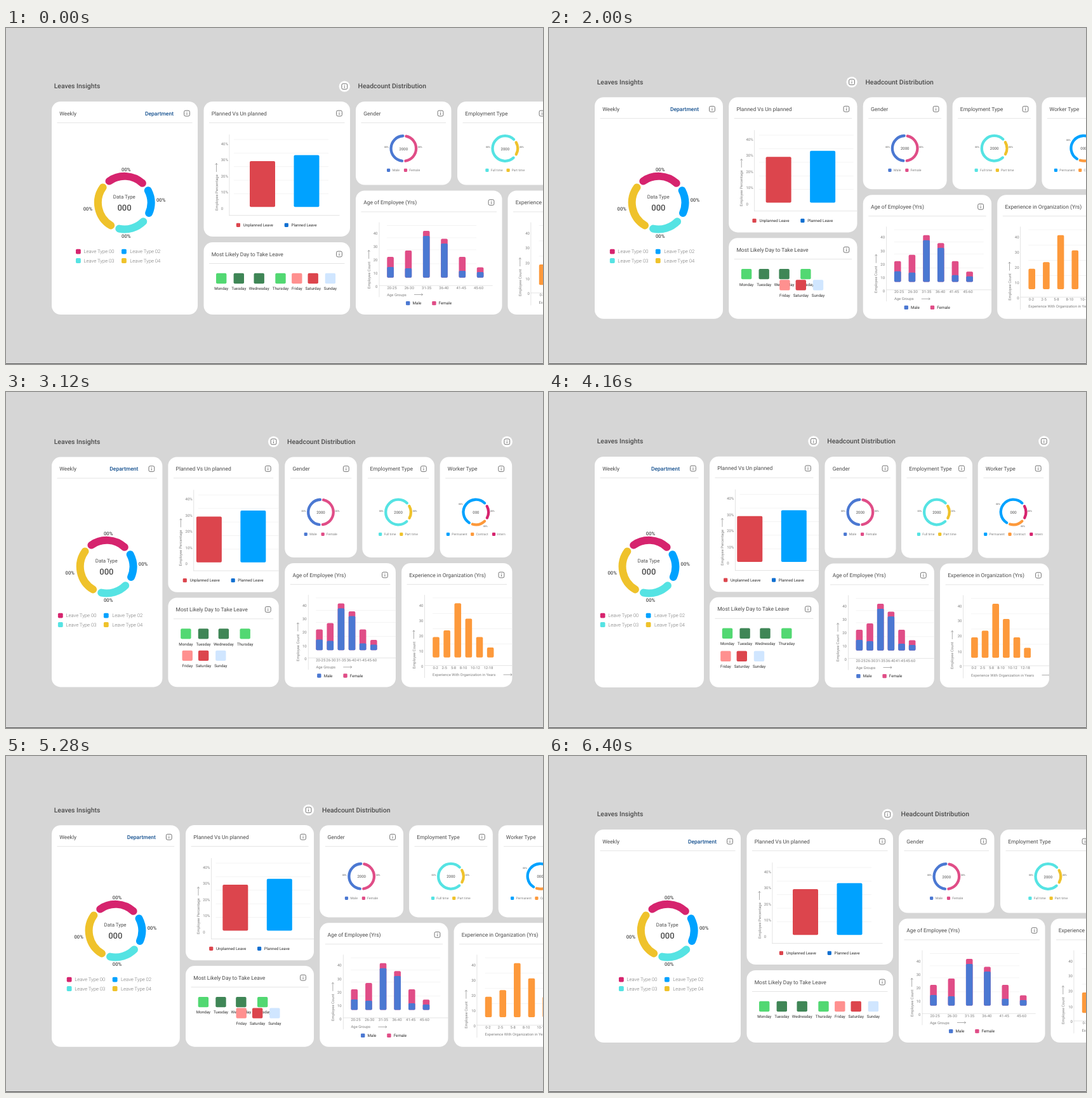
An HTML page that plays this animation: 846 by 530 pixels, repeating every 6480 ms.

```html
<!DOCTYPE html>
<html lang="en">
<head>
<meta charset="utf-8">
<title>Responsive HR dashboard</title>
<style>
  @property --p { syntax: "<number>"; inherits: true; initial-value: 0; }
  html, body { margin: 0; width: 100%; height: 100%; overflow: hidden; background: #d6d6d6; }
  #stage {
    display: block; width: 100%; height: 100%;
    font-family: Roboto, sans-serif; text-rendering: geometricPrecision;
    animation: squeeze 6480ms infinite;
  }
  /* --p: 0 is the wide layout, 1 the narrow one */
  @keyframes squeeze {
    0% { --p: 0; }
    8.64% { --p: 0; animation-timing-function: cubic-bezier(.37, 0, .63, 1); }
    54.09% { --p: 1; }
    65.43% { --p: 1; animation-timing-function: cubic-bezier(.35, .31, .65, .78); }
    98.77%, 100% { --p: 0; }
  }
  text { fill: #4c4c4c; }
  .mid { text-anchor: middle; }
  .end { text-anchor: end; }
  .medium { font-weight: 500; }
  .light { font-weight: 300; fill: #777; }
  .dim { fill: #808080; }
  .dark { fill: #2c2c2c; }
  .link { fill: #14508f; font-weight: 500; }
  .icon { fill: none; stroke: #666; stroke-width: .9; }
  .arrow { fill: none; stroke: #888; stroke-width: .7; }
  .ring { fill: none; stroke-linecap: round; }
</style>
</head>
<body>
<svg id="stage" viewBox="0 0 846 530"></svg>
<script>
const NS = "http://www.w3.org/2000/svg";
const stage = document.getElementById("stage");
const C = {
  pink: "#d6246e", sky: "#00a2ff", cyan: "#55e3e3", yellow: "#efc22b",
  red: "#dc454d", blue: "#0f6fd1", male: "#4b78d2", female: "#e04d87",
  orange: "#fd993b", mint: "#52d872", green: "#3f8656", salmon: "#ff908f",
  pale: "#d0e6ff", axis: "#dedede", grid: "#f1f1f1"
};

const mix = (a, d) => d ? `calc(${a}px + ${d}px * var(--p))` : `${a}px`;

function add(parent, tag, attrs = {}) {
  const el = document.createElementNS(NS, tag);
  for (const key in attrs) el.setAttribute(key, attrs[key]);
  return parent.appendChild(el);
}

function group(parent, x, y, dx = 0, dy = 0) {
  const g = add(parent, "g");
  g.style.transform = `translate(${mix(x, dx)}, ${mix(y, dy)})`;
  return g;
}

function rect(parent, x, y, width, height, fill, rx = 0) {
  return add(parent, "rect", { x, y, width, height, fill, rx });
}

// y is the middle of the capitals
function text(parent, str, x, y, size, cls = "") {
  const el = add(parent, "text", { x, y: y + size * .356, "font-size": size, class: cls });
  el.textContent = str;
  return el;
}

function icon(parent) {
  add(parent, "rect", { x: -4.4, y: -4.4, width: 8.8, height: 8.8, rx: 2.2, class: "icon" });
  add(parent, "path", { d: "M0 -2.4v1M0 -.5v2.9", class: "icon" });
}

function arrow(parent, x, y, turn = 0) {
  add(parent, "path", {
    d: "M0 0h13.5m-2.2 -1.8l2.2 1.8l-2.2 1.8", class: "arrow",
    transform: `translate(${x} ${y}) rotate(${turn})`
  });
}

function sideLabel(parent, str, x, y, arrowY) {
  const g = add(parent, "g", { transform: `translate(${x} ${y}) rotate(-90)` });
  text(g, str, 0, 0, 5.9, "dim");
  arrow(parent, x, arrowY, -90);
}

// Each segment is [from, to, colour], in degrees clockwise from the top
function ring(parent, r, width, segments) {
  const point = deg => {
    const a = deg * Math.PI / 180;
    return `${(r * Math.sin(a)).toFixed(2)} ${(-r * Math.cos(a)).toFixed(2)}`;
  };
  for (const [from, to, stroke] of segments) {
    add(parent, "path", {
      d: `M${point(from)}A${r} ${r} 0 ${to - from > 180 ? 1 : 0} 1 ${point(to)}`,
      stroke, "stroke-width": width, class: "ring"
    });
  }
}

// Each item is [label, colour, swatch x, text x]
function legend(parent, items, y, box, size, cls) {
  for (const [label, color, x, tx] of items) {
    rect(parent, x, y - box / 2, box, box, color, box * .22);
    text(parent, label, tx, y, size, cls);
  }
}

let cards = 0;

// Returns the group for the card's content, clipped to the card
function card(title, x, y, w, h, dx, dy, dw, dh) {
  const g = group(stage, x, y, dx, dy);
  const id = `card${++cards}`;
  for (const parent of [g, add(g, "clipPath", { id })]) {
    const face = rect(parent, 0, 0, w, h, "#fff", 14);
    face.style.width = mix(w, dw);
    face.style.height = mix(h, dh);
  }
  const c = add(g, "g", { "clip-path": `url(#${id})` });
  text(c, title, 12.2, 18.6, 8.5);
  icon(group(c, w - 17, 18.6, dw));
  rect(c, 8.5, 33, w - 17, .9, "#e2e2e2").style.width = mix(w - 17, dw);
  return c;
}

function heading(str, x, dx, iconX, iconDx) {
  text(group(stage, x, 91.7, dx, -14), str, 0, 0, 10.4, "medium");
  const g = group(stage, iconX, 92.2, iconDx, -14.4);
  add(g, "circle", { r: 8.6, fill: "#fff" });
  icon(g);
}

function weekly() {
  const c = card("Weekly", 72, 116, 230, 336, 0, -14, -58, 28);
  text(group(c, 192, 18.6, -58), "Department", 0, 0, 8.5, "link end");
  const g = group(c, 114.7, 159.6, -29.3, 14);
  ring(g, 41.8, 12, [
    [-35.4, 42.4, C.pink], [62.5, 113, C.sky], [135, 191.6, C.cyan], [211, 305.4, C.yellow]
  ]);
  text(g, "Data Type", -.4, -9.5, 7.9, "mid");
  text(g, "000", -.2, 7.8, 13, "mid medium");
  for (const [x, y] of [[2.6, -52.5], [57.4, -4], [2.6, 52.6], [-57.8, 9.6]])
    text(g, "00%", x, y, 7.7, "mid medium");
  legend(g, [["Leave Type 00", C.pink, -76.7, -64.2], ["Leave Type 02", C.sky, -4.7, 8.6]], 77, 7.8, 7.7, "light");
  legend(g, [["Leave Type 03", C.cyan, -76.7, -64.2], ["Leave Type 04", C.yellow, -4.7, 8.6]], 91.4, 7.8, 7.7, "light");
}

function planned() {
  const c = card("Planned Vs Un planned", 311.5, 116, 230.5, 213, -58.5, -14.2, -58.5, .5);
  for (let i = 0; i < 5; i++) {
    rect(c, 47.5, 59.5 + i * 21.4, 149, .8, C.grid);
    text(c, i < 4 ? `${40 - i * 10}%` : "0", 27.2, 66.5 + i * 25.5, 6, "dim");
  }
  rect(c, 40, 52, .8, 128, C.axis);
  rect(c, 40, 179.2, 174, .8, C.axis);
  sideLabel(c, "Employee Percentage", 20, 172, 111);
  const g = group(c, 0, 0, -29.2);
  rect(g, 72.5, 94, 40, 72.3, C.red, 2);
  rect(g, 142, 84.6, 40, 81.7, C.sky, 2);
  legend(g, [["Unplanned Leave", C.red, 51.3, 62.3], ["Planned Leave", C.blue, 127.2, 138]], 194.8, 6.2, 6.2, "dark");
}

function days() {
  const c = card("Most Likely Day to Take Leave", 311.5, 338, 230.5, 114, -58.5, -14.2, -58.5, 28);
  const list = [
    ["Monday", 27.7, C.mint], ["Tuesday", 55.3, C.green], ["Wednesday", 87.2, C.green],
    ["Thursday", 121, C.mint], ["Friday", 146.8, C.salmon], ["Saturday", 172.2, C.red], ["Sunday", 199.4, C.pale]
  ];
  list.forEach(([name, x, color], i) => {
    const g = i < 4 ? group(c, x, 57, .3) : group(c, x, 57, -121.4, 36);
    rect(g, -8.2, -8.2, 16.4, 16.4, color, 2);
    text(g, name, 0, 16.2, 6.2, "mid dark");
  });
}

function donut(title, x, dx, total, segments, notes, items, size) {
  const c = card(title, x, 116, 150.5, 131.5, dx, -14, -38.5, 28.2);
  const g = group(c, 75.3, 74, -19.4, 13.5);
  ring(g, 19.8, 4.3, segments);
  text(g, total, 0, .4, 6, "mid");
  for (const [nx, ny] of notes) text(g, "00%", nx, ny, 3.6, "mid");
  const l = group(c, 75.3, 108.4, -19.4, 14);
  legend(l, items, 0, 5.2, size, "dim");
}

function columns(c, bars, bottom, color) {
  bars.forEach(([top, split], i) => {
    const g = group(c, 54.6 + i * 28.3, 0, -.2 - i * 11.65);
    rect(g, -5.3, top, 10.6, bottom - top, color, 2);
    if (split) rect(g, -5.3, split, 10.6, bottom - split, C.male, 1.6);
  });
}

function scale(c, ys, x) {
  ys.forEach((y, i) => text(c, String(40 - i * 10), x, y, 6, "dim end"));
}

function age() {
  const c = card("Age of Employee (Yrs)", 551, 256.5, 230.5, 195.5, -116.5, 14, -58.2, 0);
  for (const y of [54.5, 74, 93, 115]) rect(c, 49, y, 141, .8, C.grid);
  rect(c, 36.6, 50, .8, 118, C.axis);
  rect(c, 36.6, 149.3, 179, .8, C.axis);
  scale(c, [67, 88.4, 109.4, 130.8, 151.2], 34.4);
  sideLabel(c, "Employee Count", 20.6, 154.7, 107.5);
  columns(c, [[104.6, 120.6], [94.6, 122.6], [63.5, 71.4], [76, 83.6], [104.6, 126.6], [121, 128.6]], 137.2, C.female);
  ["20-25", "26-30", "31-35", "36-40", "41-45", "45-60"].forEach((s, i) =>
    text(group(c, 57 + i * 27.3, 153, -.5 - i * 11.6), s, 0, 0, 6, "mid dim"));
  text(c, "Age Groups", 49.2, 164, 5.9, "dim");
  arrow(c, 92, 164);
  const g = group(c, 0, 177.6, -29.3);
  legend(g, [["Male", C.male, 79, 89.5], ["Female", C.female, 120.2, 130.6]], 0, 6.4, 6.3, "dark");
}

function experience() {
  const c = card("Experience in Organization (Yrs)", 790.5, 256.5, 230, 195.5, -174.5, 14, -58, 0);
  for (const y of [54.5, 79, 103, 127]) rect(c, 49, y, 146, .8, C.grid);
  rect(c, 36, 50, .8, 131, C.axis);
  rect(c, 36, 161, 179, .8, C.axis);
  scale(c, [67, 90.8, 114.8, 139, 162.8], 34.4);
  sideLabel(c, "Employee Count", 19.3, 166.5, 119.5);
  columns(c, [[116.5], [106], [63.4], [87.5], [116.5], [133]], 148.8, C.orange);
  const labels = [
    ["0-2", 54, 53.5], ["2-5", 79.5, 67], ["5-8", 104.5, 81],
    ["8-10", 131, 96], ["10-12", 160.5, 114.5], ["12-18", 192.5, 134.5]
  ];
  for (const [s, a, b] of labels) text(group(c, a, 164.6, b - a), s, 0, 0, 5.9, "mid dim");
  text(c, "Experience With Organization in Years", 49, 176, 5.9, "dim");
  arrow(c, 160.5, 176);
}

heading("Leaves Insights", 75.7, 0, 533.3, -116.5);
heading("Headcount Distribution", 554.6, -116.3, 1012, -232.2);
weekly();
planned();
days();

const sides = [[-27, -1.8], [26, -1.8]];
donut("Gender", 551, -116.5, "2000",
  [[12, 171, C.female], [187, 357, C.male]], sides,
  [["Male", C.male, -26.3, -17.6], ["Female", C.female, .6, 8.9]], 5.2);
donut("Employment Type", 711, -156, "2000",
  [[138, 404, C.cyan], [61, 118, C.yellow]], sides,
  [["Full time", C.cyan, -31, -22.6], ["Part time", C.yellow, 2.2, 10.4]], 5);
donut("Worker Type", 870.5, -194.8, "000",
  [[212, 404, C.sky], [62, 117, C.pink], [136, 196, C.orange]],
  [[-24, -13], [26, -1.8], [15, 22.3]],
  [["Permanent", C.sky, -46.5, -38], ["Contract", C.orange, -8.2, .2], ["Intern", C.pink, 25.6, 33.6]], 5);
age();
experience();
rect(stage, 0, 529, 846, 1, "#5a5a5a");
</script>
</body>
</html>
```
